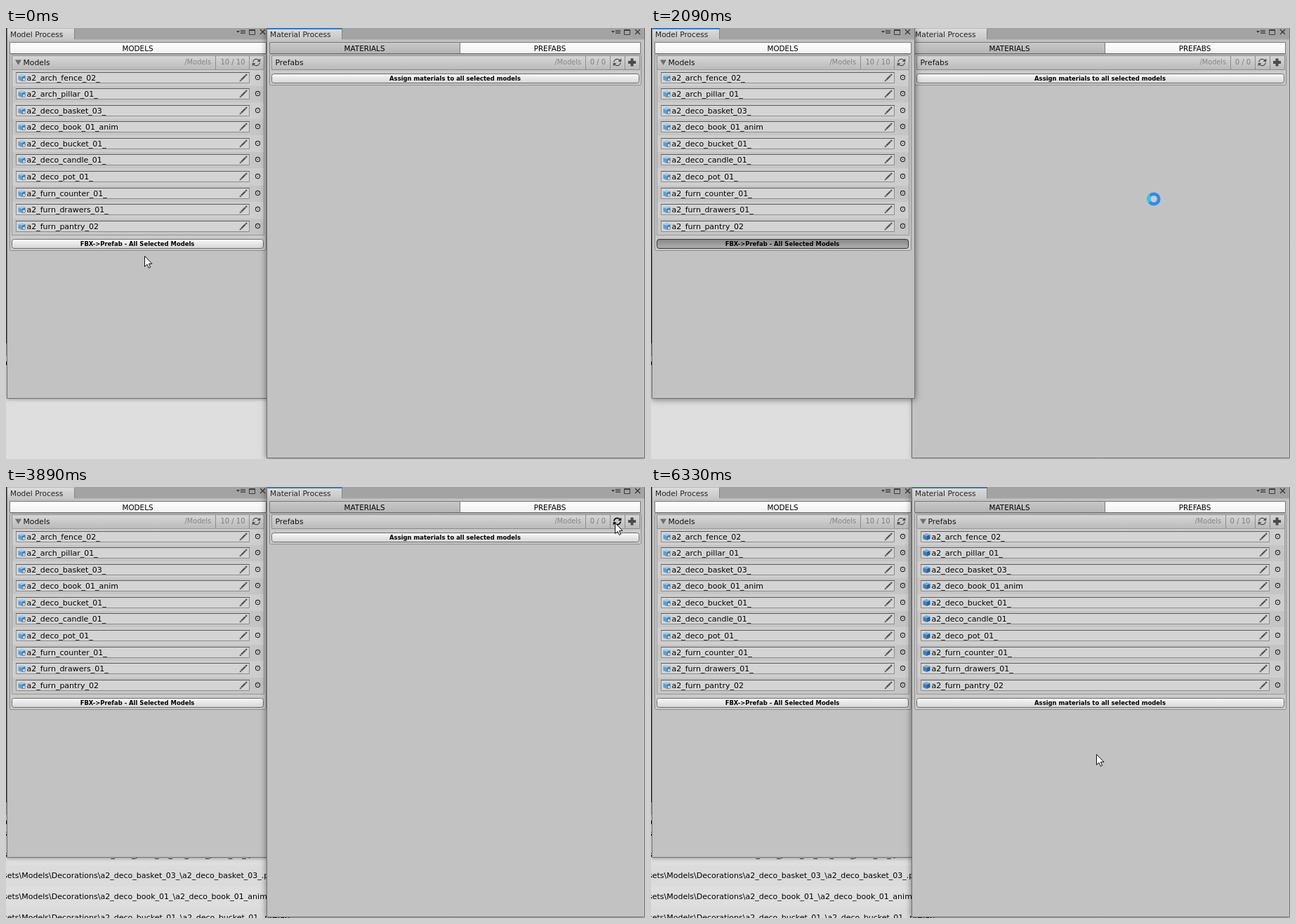
Animation of 910 by 615 pixels, one loop 6400 ms. Source, as an HTML page with a canvas:

```html
<!DOCTYPE html>
<html lang="en">
<head>
<meta charset="utf-8">
<title>Model and material windows</title>
<style>
  html, body { margin: 0; width: 100%; height: 100%; overflow: hidden; background: #dedede; }
  canvas { display: block; }
</style>
</head>
<body>
<canvas id="stage" width="910" height="615"></canvas>
<script>
const ctx = document.getElementById('stage').getContext('2d');
const LOOP = 6400;
const FONT = '"DejaVu Sans", sans-serif';
const MODELS = ['a2_arch_fence_02_', 'a2_arch_pillar_01_', 'a2_deco_basket_03_',
  'a2_deco_book_01_anim', 'a2_deco_bucket_01_', 'a2_deco_candle_01_', 'a2_deco_pot_01_',
  'a2_furn_counter_01_', 'a2_furn_drawers_01_', 'a2_furn_pantry_02'];
const LOG = [
  ['Architecture', 'a2_arch_fence_02_', 'a2_arch_fence_02_.prefab'],
  ['Architecture', 'a2_arch_pillar_01_', 'a2_arch_pillar_01_.prefab'],
  ['Decorations', 'a2_deco_basket_03_', 'a2_deco_basket_03_.prefab'],
  ['Decorations', 'a2_deco_book_01_', 'a2_deco_book_01_anim.prefab'],
  ['Decorations', 'a2_deco_bucket_01_', 'a2_deco_bucket_01_.prefab'],
].map(([group, dir, file]) => `sets\\Models\\${group}\\${dir}\\${file}`);

// Pointer moves: first step, last step, step count, end point, optional curve control.
const START = [197, 325];
const MOVES = [
  [70, 140, 2, 193, 319],
  [300, 450, 3, 195, 311],
  [1300, 1460, 3, 269, 347, 208, 341],
  [1770, 1850, 2, 443, 337],
  [1930, 2010, 2, 665, 285],
  [2090, 2090, 1, 716, 244],
  [2240, 2240, 1, 714, 244],
  [2860, 3500, 9, 858, 60, 741, 135],
  [3580, 3660, 2, 867, 51],
  [4270, 4910, 9, 623, 407],
  [5070, 5150, 2, 639, 356],
  [5700, 5780, 2, 638, 357],
  [6170, 6330, 3, 634, 381],
];

function pointerAt(t) {
  let [x, y] = START;
  for (const [from, to, steps, ex, ey, cx = (x + ex) / 2, cy = (y + ey) / 2] of MOVES) {
    if (t < from) break;
    const gap = (to - from) / (steps - 1 || 1) || 1;
    const u = Math.min(steps, Math.floor((t - from) / gap + 1e-6) + 1) / steps;
    const bend = (a, c, b) => (1 - u) ** 2 * a + 2 * u * (1 - u) * c + u * u * b;
    [x, y] = [bend(x, cx, ex), bend(y, cy, ey)];
  }
  return [Math.round(x), Math.round(y)];
}

function rect(x, y, w, h, color) {
  ctx.fillStyle = color;
  ctx.fillRect(x, y, w, h);
}

function shade(y, h, top, bottom) {
  const g = ctx.createLinearGradient(0, y, 0, y + h);
  g.addColorStop(0, top);
  g.addColorStop(1, bottom);
  return g;
}

function frame(x, y, w, h, fill, line, radius = 0) {
  ctx.beginPath();
  ctx.roundRect(x + .5, y + .5, w - 1, h - 1, radius);
  if (fill) { ctx.fillStyle = fill; ctx.fill(); }
  ctx.strokeStyle = line;
  ctx.lineWidth = 1;
  ctx.stroke();
}

function text(str, x, y, size = 11, color = '#000', align = 'left', weight = 'normal') {
  ctx.font = `${weight} ${size}px ${FONT}`;
  ctx.textAlign = align;
  ctx.fillStyle = color;
  ctx.fillText(str, x, y);
}

function path(points, color, width) {
  ctx.beginPath();
  points.forEach(([x, y]) => ctx.lineTo(x, y));
  if (width) {
    ctx.strokeStyle = color;
    ctx.lineWidth = width;
    ctx.stroke();
  } else {
    ctx.closePath();
    ctx.fillStyle = color;
    ctx.fill();
  }
}

function arc(x, y, r, a, b, color, width) {
  ctx.beginPath();
  ctx.arc(x, y, r, a, b);
  ctx.strokeStyle = color;
  ctx.lineWidth = width;
  ctx.stroke();
}

function at(x, y, draw) {
  ctx.save();
  ctx.translate(x, y);
  draw();
  ctx.restore();
}

function cube(x, y, isModel) {
  at(x, y, () => {
    path([[-5, -3], [0, -5], [5, -3], [0, -1]], isModel ? '#9cc9ea' : '#78aedb');
    path([[-5, -3], [0, -1], [0, 5], [-5, 3]], isModel ? '#5d9fd2' : '#3f7fb8');
    path([[5, -3], [0, -1], [0, 5], [5, 3]], isModel ? '#3d79aa' : '#285f94');
    if (isModel) frame(1, 0, 4, 5, '#eeeeee', '#7d8b98');
  });
}

function pencil(x, y) {
  path([[x - 3, y + 3], [x + 3, y - 3]], '#505050', 2.3);
  path([[x + 3.4, y - 3.4], [x + 5, y - 5]], '#505050', 2.2);
  path([[x - 5.5, y + 5.5], [x - 4.5, y + 2.5], [x - 2.5, y + 4.5]], '#505050');
}

function refresh(x, y, active) {
  const color = active ? '#111' : '#4c4c4c', width = active ? 1.8 : 1.3;
  for (const turn of [0, Math.PI]) at(x, y, () => {
    ctx.rotate(turn);
    arc(0, 0, 4.7, Math.PI * 1.02, Math.PI * 1.8, color, width);
    path([[5.8, -5.6], [5.8, -1], [1.2, -1]], color);
  });
}

function windowIcons(right) {
  const c = '#3c3c3c';
  path([[right - 43, 4], [right - 38, 4], [right - 40.5, 7]], c);
  for (const y of [3, 5, 7]) rect(right - 37, y, 7, 1, c);
  frame(right - 25, 2, 9, 8, null, c);
  rect(right - 25, 2, 9, 2, c);
  path([[right - 9, 2], [right - 2, 9]], c, 1.4);
  path([[right - 2, 2], [right - 9, 9]], c, 1.4);
}

function chrome(x, w, h, title, tabWidth, focused, iconsRight) {
  ctx.save();
  ctx.shadowColor = `rgba(0,0,0,${focused ? .5 : .3})`;
  ctx.shadowBlur = focused ? 9 : 5;
  ctx.shadowOffsetY = 1;
  rect(x, 0, w, h, '#c2c2c2');
  ctx.restore();
  frame(x, -1, w, h + 1, null, '#707070');
  rect(x + 1, 0, w - 2, 16, '#a3a3a3');
  rect(x + 1, 16, w - 2, 1, '#b5b5b5');
  rect(x + 1, 0, tabWidth, 17, shade(0, 17, '#dedede', '#c6c6c6'));
  rect(x + tabWidth, 1, 1, 15, '#868686');
  rect(x + 1, 0, tabWidth, focused ? 2 : 1, focused ? '#3d78bf' : '#b9b9b9');
  text(title, x + 5, 12.5, 10.6, '#222');
  windowIcons(iconsRight);
}

function toolbarTab(x, w, label, lit) {
  frame(x, 20, w, 17, lit ? shade(20, 17, '#ffffff', '#f0f0f0') : shade(20, 17, '#c9c9c9', '#b4b4b4'), '#777');
  text(label, x + w / 2 - .5, 32.5, 10.4, '#000', 'center');
}

function button(x, y, w, label, pressed) {
  const fill = pressed ? shade(y, 14, '#858585', '#b2b2b2') : shade(y, 14, '#fafafa', '#d4d4d4');
  frame(x, y, w, 14, fill, pressed ? '#363636' : '#6c6c6c', 3);
  text(label, x + w / 2 - .5, y + 10, 8.45, '#000', 'center', 'bold');
}

function list(x, w, fieldWidth, isModel) {
  rect(x, 60, w, 236, '#cecece');
  MODELS.forEach((name, i) => {
    const y = Math.round(70.5 + i * 23.58);
    if (i % 2) rect(x, y - 11, w, 23, '#c5c5c5');
    frame(x + 6, y - 8, fieldWidth, 16, '#d4d4d4', '#8d8d8d');
    rect(x + 6, y - 8, fieldWidth, 1, '#5c5c5c');
    cube(x + 14.5, y, isModel);
    text(name, x + 21.5, y + 4);
    pencil(x + fieldWidth - 3, y);
    const dotX = x + fieldWidth + 17.5;
    arc(dotX, y - .5, 3.1, 0, Math.PI * 2, '#2a2a2a', 1.1);
    rect(dotX - .5, y - 1, 1, 1, '#111');
  });
  frame(x, 59, w, 237, null, '#979797');
}

function header(x, w, title, open, countX, count, separators) {
  frame(x, 39, w, 21, shade(39, 21, '#d8d8d8', '#b9b9b9'), '#898989');
  if (open) path([[x + 5, 45.5], [x + 14, 45.5], [x + 9.5, 53]], '#6e6e6e');
  text(title, x + (open ? 16.5 : 5.5), 53, 10.8, '#111');
  for (const s of separators) rect(s, 40, 1, 19, '#8d8d8d');
  text('/Models', separators[0] - 6, 52.3, 9.7, '#848484', 'right');
  text(count, countX, 52.3, 10, '#7c7c7c', 'center');
}

function modelWindow(focused, pressed) {
  chrome(1, 375, 529, 'Model Process', 96, focused, 371);
  frame(5, 37, 366, 281, '#cacaca', '#8d8d8d', 2);
  toolbarTab(5, 366, 'MODELS', true);
  header(8, 360, 'Models', true, 323, '10 / 10', [298, 346]);
  refresh(356.5, 49);
  list(8, 360, 333, true);
  button(8, 301, 359, 'FBX->Prefab - All Selected Models', pressed);
}

function materialWindow(focused, loaded, hot) {
  chrome(371, 539, 614, 'Material Process', 107, focused, 905);
  frame(375, 37, 530, loaded ? 281 : 45, '#cacaca', '#8d8d8d', 2);
  toolbarTab(375, 272, 'MATERIALS', false);
  toolbarTab(646, 258, 'PREFABS', true);
  header(378, 525, 'Prefabs', loaded, loaded ? 839 : 843, loaded ? '0 / 10' : '0 / 0',
    [loaded ? 818 : 825, 860, 881]);
  refresh(870.5, 49, hot);
  rect(886, 47, 11, 4, '#4b4b4b');
  rect(889.5, 43.5, 4, 11, '#4b4b4b');
  if (loaded) list(378, 525, 497, false);
  button(378, loaded ? 301 : 65, 524, 'Assign materials to all selected models');
}

function backdrop(logged) {
  rect(0, 0, 910, 615, '#dedede');
  rect(0, 0, 2, 450, '#2d2d2d');
  rect(0, 450, 2, 18, '#a2a2a2');
  text('n', -5, 481);
  if (!logged) return;
  rect(0, 540, 910, 30, '#dbdbdb');
  rect(0, 600, 910, 15, '#dbdbdb');
  LOG.forEach((line, i) => text(line, -4, 498 + i * 30));
}

function pointer(x, y, busy) {
  at(x, y, () => {
    if (busy) {
      ctx.beginPath();
      ctx.arc(0, 0, 5.5, 0, Math.PI * 2);
      ctx.fillStyle = '#cbcbd0';
      ctx.fill();
      arc(0, 0, 7.2, 0, Math.PI * 2, '#2c8cec', 4.8);
      arc(0, 0, 7.2, Math.PI * .8, Math.PI * 1.25, '#30c4f6', 4.8);
      return;
    }
    const shape = [[.5, .5], [.5, 15.5], [4, 12.3], [6.3, 17.4], [8.6, 16.4], [6.3, 11.4], [11, 11.4]];
    path(shape, '#fff');
    path([...shape, shape[0]], '#111', 1);
  });
}

function draw(t) {
  const modelFocused = t >= 610 && t < 3890;
  const drawModel = () => modelWindow(modelFocused, t >= 680 && t < 2240);
  const drawMaterial = () => materialWindow(!modelFocused, t >= 4040, t >= 3580 && t < 4270);
  backdrop(t >= 2240);
  const order = modelFocused ? [drawMaterial, drawModel] : [drawModel, drawMaterial];
  order.forEach(paint => paint());
  pointer(...pointerAt(t), t >= 840 && t < 2240);
}

const began = performance.now();
function tick() {
  draw((performance.now() - began) % LOOP);
  requestAnimationFrame(tick);
}
tick();
</script>
</body>
</html>
```
